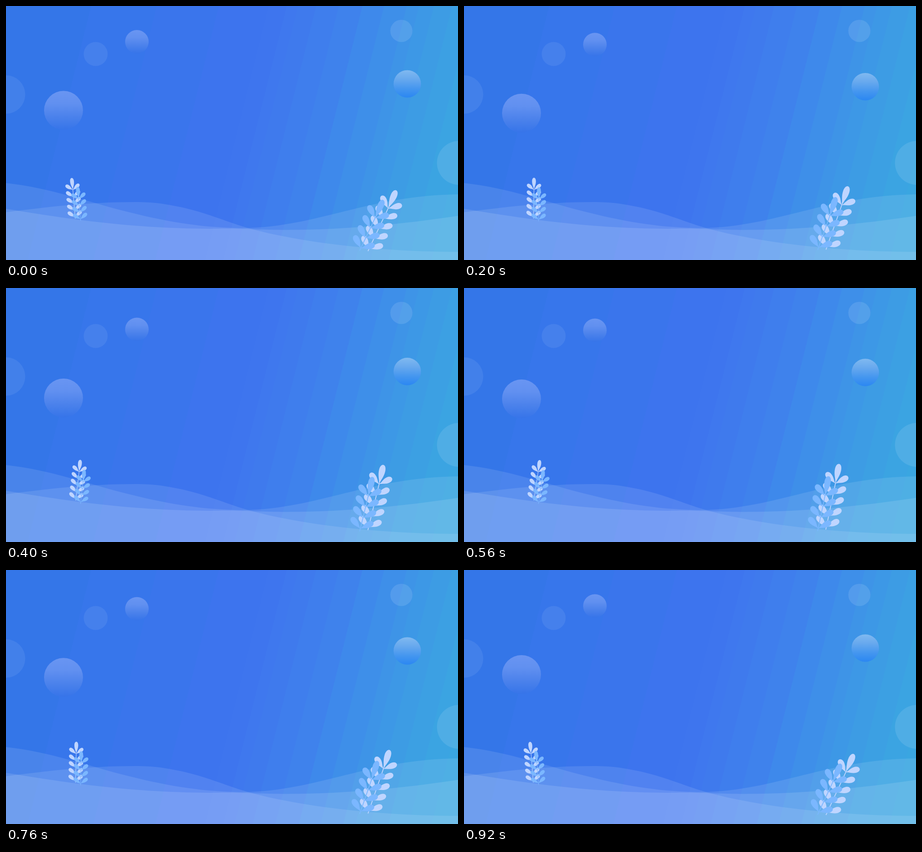
Recreate the animation shown at these times as an HTML page with a canvas. Size 998 by 561 pixels, loop 0.96 s.

```html
<!DOCTYPE html>
<html lang="en">
<head>
<meta charset="utf-8">
<title>Blue landscape</title>
<style>
  html, body { margin: 0; overflow: hidden; }
  canvas { display: block; }
</style>
</head>
<body>
<canvas id="stage" width="998" height="561"></canvas>
<script>
const ctx = document.getElementById('stage').getContext('2d');
const W = 998, H = 561, LOOP = 960, PEAK = 520, REST = 933;
const LIGHT = '#bfd5ff', BLUE = '#7bb7ff';
const white = alpha => `rgba(255,255,255,${alpha})`;
const rad = deg => deg * Math.PI / 180;

// Slanted sky bands: [position where each one begins, colour]
const SPAN = 1140;
const bands = [
  [0, '#3476e8'], [188, '#3776eb'], [333, '#3a75ec'], [470, '#3d74ee'],
  [580, '#3e75ee'], [620, '#3f78ee'], [645, '#3f7aed'], [685, '#3f7eed'],
  [735, '#3f82ec'], [787, '#3e89eb'], [835, '#3e8fe9'], [885, '#3e94e7'],
  [912, '#3d98e6'], [945, '#3d9ce4'], [985, '#3ca0e3'], [1030, '#3ba4e2'],
  [1080, '#3aa6e1']
];
const k = SPAN / 1.0625;
const sky = ctx.createLinearGradient(0, 0, k, k / 4);
bands.forEach(([start, color], i) => {
  const end = i + 1 < bands.length ? bands[i + 1][0] : SPAN;
  sky.addColorStop(start / SPAN, color);
  sky.addColorStop(end / SPAN, color);
});

const waves = [
  [0.1, 'M0 391C95 401 185 434 270 455C365 479 440 490 525 490.500C690 488 800 418 998 416'],
  [0.1, 'M0 455.500C90 444 180 433 285 433C330 433 350 437 390 445C450 459 490 478 540 492C660 524 830 543 998 543'],
  [0.115, 'M0 448C120 467 260 491 450 492C510 490 550 494 620 494.500C760 494 880 481 998 463.500']
].map(([alpha, top]) => [white(alpha), new Path2D(`${top}V${H}H0Z`)]);

const discs = [[198, 106, 26.5, 0.07], [0, 195.5, 42.5, 0.07], [873, 55, 24.5, 0.11], [1000, 346.5, 48.5, 0.1]];

const pale = ['#6995f2', '#6190f0', '#4a81eb', '#3674e9'];
const balls = [
  [127, 230.5, 43, pale],
  [289, 79, 26, pale],
  [886, 172, 30.3, ['#80b9f0', '#68a9ee', '#4496ef', '#2b87f2']]
];

const leafShape = new Path2D('M0 0C-2 -12 -7 -18 -7 -31C-7 -39 -4 -44 0 -44C4 -44 7 -39 7 -31C7 -18 2 -12 0 0Z');

function disc(x, y, r, fill) {
  ctx.fillStyle = fill;
  ctx.beginPath();
  ctx.arc(x, y, r, 0, 7);
  ctx.fill();
}

function ball(x, y, r, colors) {
  const shade = ctx.createLinearGradient(0, y - r, 0, y + r);
  [0, 0.32, 0.68, 1].forEach((stop, i) => shade.addColorStop(stop, colors[i]));
  disc(x, y, r, shade);
}

function leaf(y, angle, sx, sy) {
  ctx.save();
  ctx.translate(0, y);
  ctx.rotate(rad(angle));
  ctx.scale(sx, sy);
  ctx.fill(leafShape);
  ctx.restore();
}

// (x, y) is the topmost joint of the stem
function plant(x, y, tilt, scale, pairs, color) {
  const step = 24.5;
  ctx.save();
  ctx.translate(x, y);
  ctx.rotate(rad(tilt));
  ctx.scale(scale, scale);
  ctx.fillStyle = color;
  ctx.fillRect(-0.9, -4, 1.8, (pairs - 1) * step + 10);
  leaf(0, -1, 1, 1);
  for (let i = 0; i < pairs; i++) {
    leaf(i * step, -52, 0.95, 0.72);
    leaf(i * step, 51, 0.95, 0.72);
  }
  ctx.restore();
}

function sway(cx, cy, angle, drawPlants) {
  ctx.save();
  ctx.translate(cx, cy);
  ctx.rotate(rad(angle));
  ctx.translate(-cx, -cy);
  drawPlants();
  ctx.restore();
}

function draw() {
  const t = performance.now() % LOOP;
  const p = t < PEAK ? t / PEAK : Math.max(0, (REST - t) / (REST - PEAK));
  const angle = 15 * (p - 0.385);

  ctx.fillStyle = sky;
  ctx.fillRect(0, 0, W, H);
  for (const [fill, path] of waves) {
    ctx.fillStyle = fill;
    ctx.fill(path);
  }
  for (const [x, y, r, alpha] of discs) disc(x, y, r, white(alpha));
  for (const [x, y, r, colors] of balls) ball(x, y + 16.1 * p, r, colors);

  sway(155, 474, angle, () => {
    plant(154.5, 406, 1, 0.61, 5, LIGHT);
    plant(165.5, 427, 1, 0.61, 4, BLUE);
  });
  sway(766, 539, -angle, () => {
    plant(834, 440, 19.5, 1, 5, LIGHT);
    plant(807.5, 464, 19.5, 1, 4, BLUE);
  });
  requestAnimationFrame(draw);
}
draw();
</script>
</body>
</html>
```
